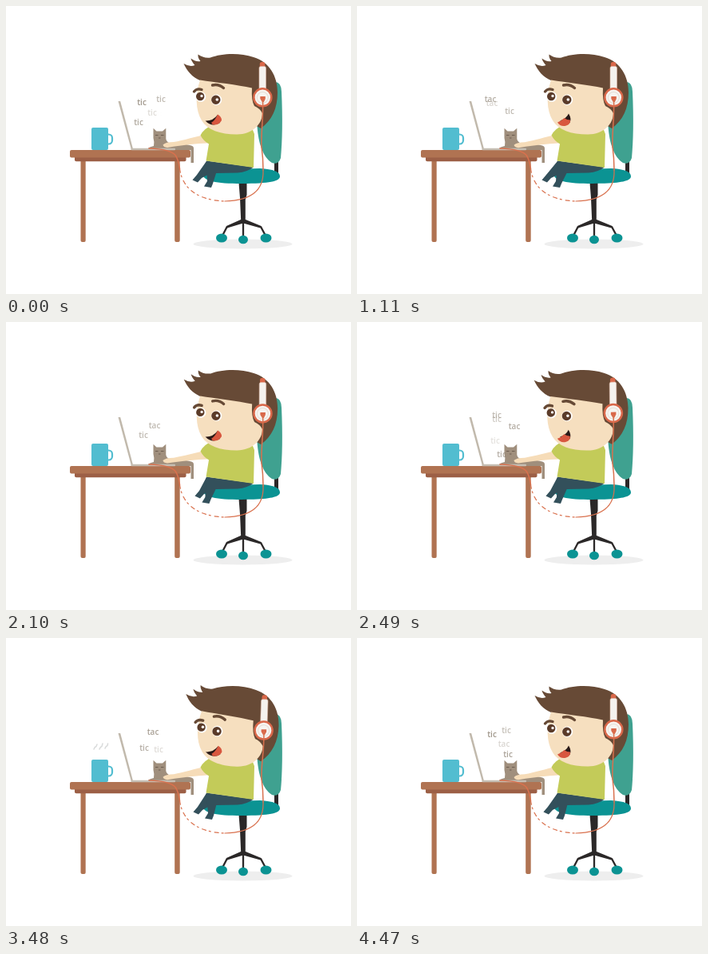
An HTML page that plays this animation: 432 by 360 pixels, repeating every 4.5 s.

```html
<!DOCTYPE html>
<html lang="en">
<head>
<meta charset="utf-8">
<title>Typing to music</title>
<style>
html, body { margin: 0; width: 100%; height: 100%; overflow: hidden; background: #fff; }
svg { display: block; width: 100vw; height: 100vh; }
text { font: 600 10px "Open Sans", "Noto Sans", sans-serif; text-anchor: middle; fill: #948a7c; }
</style>
</head>
<body>
<svg id="stage" viewBox="0 0 432 360">
  <ellipse cx="296.500" cy="297.500" rx="62" ry="6" fill="#eeeeee"/>

  <!-- chair -->
  <rect x="336" y="190" width="5" height="20" fill="#2b2828"/>
  <path fill="#3fa190" d="M337 95Q344.500 95 345 107C346.500 140 346 170 344 190Q341 199 333 196C322 189 316 172 314.500 150L326 100Z"/>
  <path fill="#2b2828" d="M291.500 221H301.500V236L299.800 242V268H294.200L293 240Z"/>
  <path fill="#2b2828" d="M276 275L294 267H300L319.500 275L318.500 277.500L297 271.500L277 277.500Z"/>
  <g fill="none" stroke="#2b2828" stroke-width="2.300">
    <path d="M277 275.500L270.500 288M318.800 275.500L325.500 288"/>
    <path d="M297 266V289"/>
  </g>
  <g fill="#0b9393">
    <ellipse cx="270" cy="290" rx="7" ry="5.500"/>
    <ellipse cx="297" cy="292" rx="6" ry="5.200"/>
    <ellipse cx="325.500" cy="290" rx="7" ry="5.500"/>
    <path d="M250 205L318 203C335 204 343 207 343 213C343 219 330 222 295 222C263 222 246 219 246 209Q246 206 250 205Z"/>
  </g>

  <!-- cup -->
  <g id="steam" fill="none" stroke="#c9cccc" stroke-width="1.500" stroke-linecap="round">
    <path d="M110 139Q111 136 113 135.500L114 133M117 139Q118 136 120 135.500L121 132M124 138Q125 135 127 134.500L127.500 132"/>
  </g>
  <rect x="121" y="160.500" width="12" height="12" rx="4.500" fill="none" stroke="#52bdd0" stroke-width="2.200"/>
  <path fill="#52bdd0" d="M109 152H126Q128 152 128 154V178Q128 180 126 180H109Q107 180 107 178V154Q107 152 109 152Z"/>

  <!-- table -->
  <g fill="#b07352">
    <path d="M93.500 193H99.700V293Q99.700 295 98 295H95.500Q93.500 295 93.500 293Z"/>
    <path d="M211.200 193H217.700V293Q217.700 295 215.700 295H213.200Q211.200 295 211.200 293Z"/>
  </g>
  <path fill="#9c5f46" d="M86 188H225.500V192.500Q225.500 194.300 223.500 194.300H88Q86 194.300 86 192.500Z"/>
  <rect x="80" y="180" width="151" height="9.500" rx="2" fill="#b07352"/>

  <!-- cat and laptop -->
  <path fill="#a08f7d" d="M184.500 152.800L188.500 156.500H196L200.300 152.800V166Q201 170 206 172C216 171 226 173 232 174.500Q235 175 235 178V196H231.500V180H177Q177 176.500 185 175Q186 170 184.500 165Z"/>
  <path fill="none" stroke="#6d5d50" d="M187 161.500H190.500M194 161.500H197.500M191 165H193.500"/>
  <path fill="#c1b9ac" d="M140.500 119H143.200L159 178.500L157 180Z"/>
  <rect x="156.500" y="177.800" width="55.500" height="2.400" rx="1" fill="#c5beb3"/>

  <g id="words"></g>

  <!-- body -->
  <path id="legA" fill="#33505b"/>
  <path id="legB" fill="#33505b"/>
  <path fill="#33505b" d="M251 193.500L310 201.500Q302 207.500 290 208.500L262 209Q250 208 250 199Z"/>
  <path id="arm" fill="#f6dcb8" d="M250 160.500C237 163.500 222 168 210 170Q200 170 196.500 173.500Q197 176.500 202 177L211 175.500C224 174 238 172 252 171.500Z"/>
  <path fill="#c3cb59" d="M258 149L309 155L311 160L310 202L250.500 193.500L254 172.500Q247 168.500 243.500 161.500Q248 153 258 149Z"/>

  <!-- head -->
  <g id="head">
    <path fill="#674a36" d="M222.500 72Q230 76.500 236.500 74Q232 69 231.500 65.500Q237 70 243.500 69Q240 65 240.500 60.500Q247 65.500 256 64.500C270 59 293 58 310 64C330 70 340 88 340 108C340 128 333 143 319 153L280 130L243 93C233 89 226.500 81 222.500 72Z"/>
    <path fill="#f6dfbf" d="M243 92.500C262 95.500 290 98.500 308 102.500Q307 118 311 125Q318 128 321 134C321 147 309 160.500 289 160.500C268 160.500 252 155 245 143C237 130 237 110 243 92.500Z"/>
    <path fill="none" stroke="#674a36" stroke-width="3.400" stroke-linecap="round" d="M235.500 107Q239 102.500 245 104.500M258.500 99Q266 97 272.500 102.500"/>
    <circle cx="244" cy="113.500" r="6.300" fill="#fff"/>
    <circle cx="263.500" cy="117.200" r="6.700" fill="#fff"/>
    <circle cx="243.200" cy="113" r="5.200" fill="#5b3b29"/>
    <circle cx="262.800" cy="117.300" r="5.700" fill="#5b3b29"/>
    <circle cx="245" cy="112.500" r="1.700" fill="#fff"/>
    <circle cx="264.300" cy="117" r="1.800" fill="#fff"/>
    <g id="wide">
      <path fill="#2a1a18" d="M249.500 143.500Q259 144 265 136L268 146Q258 152 249.500 143.500Z"/>
      <path fill="#d8573f" d="M257 146Q262 143 265 135.500Q270 138 270 143Q267 149 259 148.500Z"/>
    </g>
    <g id="small">
      <path fill="#2a1a18" d="M254 143.500Q262 141 265 134.500Q269 141 266.500 146Z"/>
      <path fill="#d8573f" d="M251 145.500Q256 144 259.500 140Q263 142.500 267 142.500Q267.500 148 262 149.500Q255 151.500 251 145.500Z"/>
    </g>
    <rect x="317.800" y="70" width="6.500" height="9" rx="2.500" fill="#d9684a"/>
    <rect x="317" y="75.500" width="8.500" height="31" rx="2" fill="#f5f2ee" stroke="#dfb9a8" stroke-width=".6"/>
    <circle cx="321.300" cy="114.300" r="11" fill="#f7f4f0" stroke="#d9684a" stroke-width="2.500"/>
    <circle cx="321.300" cy="114.500" r="7" fill="none" stroke="#e6ddd5"/>
    <path fill="#d9684a" d="M318.300 113H324.800V116L322.800 120H320.800L318.300 116Z"/>
  </g>

  <!-- headphone cable -->
  <g fill="none" stroke="#d9714e" stroke-width="1.500" stroke-linecap="round">
    <path id="lead"/>
    <path d="M179 178C196 178.500 208 181 212.500 187Q216 193 217.500 203"/>
    <g id="loop" stroke-width="1.200">
      <path d="M322 205C323 230 308 243 274 244"/>
      <path stroke-dasharray="5 4 2 5" d="M217.500 203C221 231 244 243 274 244"/>
    </g>
    <path id="cut" d="M217.500 203L221 220.500M279 242.500Q292 243 301 237.500M322 205Q320.500 216 317.500 222"/>
  </g>
</svg>
<script>
const LOOP = 4500, BEAT = 750;
const $ = id => document.getElementById(id);

// smooth periodic curve through [phase, value] points
function curve(keys) {
  const n = keys.length;
  const at = i => {
    const k = keys[(i + n) % n];
    return [k[0] + Math.floor(i / n), k[1]];
  };
  const slope = i => {
    const a = at(i - 1), b = at(i + 1);
    return (b[1] - a[1]) / (b[0] - a[0]);
  };
  return p => {
    let i = n - 1;
    while (i > 0 && keys[i][0] > p) i--;
    const a = at(i), b = at(i + 1), d = b[0] - a[0], u = (p - a[0]) / d;
    const s = u * u * (3 - 2 * u);
    return a[1] + (b[1] - a[1]) * s
      + d * (slope(i) * u * (1 - u) ** 2 - slope(i + 1) * u * u * (1 - u));
  };
}

const tilt = curve([[0, 0], [.24, -1.1], [.32, -.6], [.48, 0], [.64, 1.9], [.84, -.2], [.96, 0]]);
const footA = curve([[0, 236], [.24, 239], [.32, 239], [.48, 234], [.64, 237], [.84, 239], [.96, 236]]);
const footB = curve([[0, 250], [.24, 250], [.32, 248], [.48, 247], [.64, 251], [.84, 247], [.96, 251]]);

// word, middle time, x, y, strength
const words = [
  ["tic", 0, 170, 121, .9], ["tic", 0, 194, 117, .6], ["tic", 0, 183, 134, .3], ["tic", 0, 166, 146, .75],
  ["tic", 320, 176, 140, .6], ["tac", 320, 190, 125, .5],
  ["tic", 630, 197, 127, .45], ["tac", 630, 170, 158, .5],
  ["tac", 1110, 167, 117, .7], ["tac", 1110, 169, 122, .35], ["tic", 1110, 191, 132, .6],
  ["tic", 1680, 165, 117, .15], ["tac", 1680, 193, 127, .2], ["tic", 1680, 181, 153, .4],
  ["tac", 2080, 186, 130, .6], ["tic", 2080, 172, 142, .6],
  ["tic", 2490, 175, 117, .6], ["tic", 2490, 175, 122, .45], ["tac", 2490, 197, 131, .7],
  ["tic", 2490, 173, 149, .25], ["tic", 2490, 181, 166, .7],
  ["tic", 2990, 170, 128, .6], ["tac", 2990, 188, 142, .6],
  ["tac", 3480, 184, 118, .8], ["tic", 3480, 173, 138, .7], ["tic", 3480, 191, 140, .3],
  ["tic", 3980, 172, 124, .6], ["tac", 3980, 190, 140, .6],
  ["tic", 4470, 169, 121, .9], ["tic", 4470, 187, 116, .55], ["tac", 4470, 184, 133, .35], ["tic", 4470, 189, 146, .8]
].map(([word, time, x, y, alpha]) => {
  const el = document.createElementNS("http://www.w3.org/2000/svg", "text");
  el.textContent = word;
  el.setAttribute("x", x);
  $("words").append(el);
  return { el, time, y, alpha };
});

const fade = (dist, hold, end) => Math.max(0, Math.min(1, (end - dist) / (end - hold)));
const show = (id, on) => $(id).setAttribute("visibility", on ? "visible" : "hidden");

function draw(t) {
  const p = t % BEAT / BEAT, a = footA(p), b = footB(p), angle = tilt(p);

  $("head").setAttribute("transform", `rotate(${angle} 285 155)`);
  const wide = p < .1 || (p > .56 && p < .9);
  show("wide", wide);
  show("small", !wide);

  $("legA").setAttribute("d", `M251 194L264 205L${a + 9} 215L${a + 4} 220.500L${a - 2.500} 217.500L${a + 3} 211Z`);
  $("legB").setAttribute("d", `M251 196L264 206L${b + 9} 222L${b + 7} 227L${b - 2} 225.500L${b + 2} 219Z`);
  const tap = .5 * Math.sin(8 * Math.PI * p);
  $("arm").setAttribute("transform", `rotate(${tap} 250 165)`);

  const x = 321.5 + angle * .68;
  $("lead").setAttribute("d", `M${x} 117C${x + 1} 140 319 160 320 176Q322 190 322 205`);
  const gap = Math.abs(t - 630) < 120 || Math.abs(t - 1680) < 120;
  show("loop", !gap);
  show("cut", gap);

  for (const w of words) {
    const d = t - w.time, o = w.alpha * fade(Math.abs(d), 120, 320);
    w.el.setAttribute("visibility", o ? "visible" : "hidden");
    w.el.setAttribute("opacity", o);
    w.el.setAttribute("y", w.y + 3.5 - d * .03);
  }

  const s = t - 3480;
  $("steam").setAttribute("opacity", .7 * fade(Math.abs(s), 100, 550));
  $("steam").setAttribute("transform", `translate(0 ${-s * .01})`);
}

function tick() {
  draw(performance.now() % LOOP);
  requestAnimationFrame(tick);
}
tick();
</script>
</body>
</html>
```
